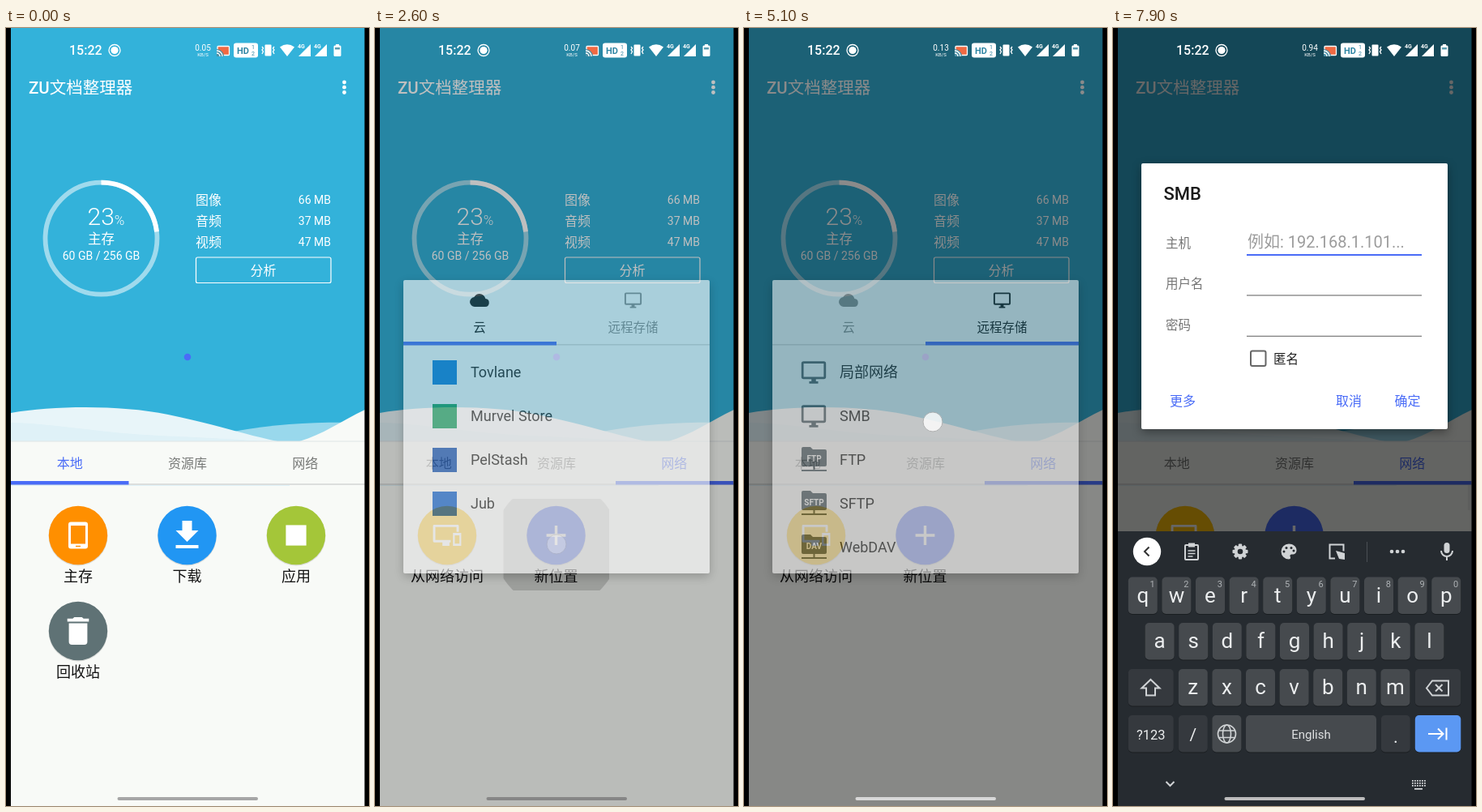
An HTML page that plays this animation: 448x960 px, repeating every 8000 ms.

```html
<!DOCTYPE html>
<html lang="zh-CN">
<head>
<meta charset="utf-8">
<style>
html,body{margin:0;width:100%;height:100%;overflow:hidden;background:#000}
svg{display:block;width:100%;height:100%;font-family:Roboto,"Noto Sans CJK SC","Noto Sans CJK",sans-serif}
.card{filter:drop-shadow(0 4px 6px rgba(0,0,0,.35))}
</style>
</head>
<body>
<svg id="stage" viewBox="0 0 448 960"></svg>
<script>
const BLUE = '#4a6cf7', PAGE = '#f8faf7', GREY = '#777977';
const stage = document.getElementById('stage');

const text = (x, y, size, s, fill = '#fff', more = '') =>
  `<text x="${x}" y="${y}" font-size="${size}" fill="${fill}" ${more}>${s}</text>`;
const mid = (x, y, size, s, fill, more = '') => text(x, y, size, s, fill, `text-anchor="middle" ${more}`);
const rect = (x, y, w, h, fill, r = 0, more = '') =>
  `<rect x="${x}" y="${y}" width="${w}" height="${h}" rx="${r}" fill="${fill}" ${more}/>`;
const circle = (x, y, r, fill, more = '') => `<circle cx="${x}" cy="${y}" r="${r}" fill="${fill}" ${more}/>`;
const path = (d, fill, more = '') => `<path d="${d}" fill="${fill}" ${more}/>`;
const line = (d, color, w = 2) => path(d, 'none', `stroke="${color}" stroke-width="${w}"`);
const group = (id, body) => `<g id="${id}">${body}</g>`;
const icon = (name, x, y, s = 1, fill = '#fff') => path(ICONS[name], fill,
  `fill-rule="evenodd" transform="translate(${x} ${y}) scale(${s}) translate(-12 -12)"`);

const ICONS = {
  tablet: 'M6 1h12a2 2 0 012 2v18a2 2 0 01-2 2H6a2 2 0 01-2-2V3a2 2 0 012-2zM6 4v15h12V4zM10 20.5v1h4v-1z',
  download: 'M19 9h-4V3H9v6H5l7 7 7-7zM5 18v2h14v-2z',
  square: 'M5 5h14v14H5z',
  bin: 'M6 19a2 2 0 002 2h8a2 2 0 002-2V7H6zM19 4h-3.5l-1-1h-5l-1 1H5v2h14z',
  image: 'M21 19V5a2 2 0 00-2-2H5a2 2 0 00-2 2v14a2 2 0 002 2h14a2 2 0 002-2zM8.5 13.5l2.5 3 3.5-4.5 4.5 6H5z',
  note: 'M12 3v10.55A4 4 0 1014 17V7h4V3z',
  play: 'M12 2a10 10 0 100 20 10 10 0 000-20zM10 16.5v-9l6 4.5z',
  doc: 'M19 3H5a2 2 0 00-2 2v14a2 2 0 002 2h14a2 2 0 002-2V5a2 2 0 00-2-2zM14 17H7v-2h7zM17 13H7v-2h10zM17 9H7V7h10z',
  clock: 'M12 2a10 10 0 100 20 10 10 0 000-20zm0 18a8 8 0 110-16 8 8 0 010 16zM12.5 7H11v6l5.2 3.2.8-1.3-4.5-2.7z',
  monitor: 'M21 2H3a2 2 0 00-2 2v12a2 2 0 002 2h7v2H8v2h8v-2h-2v-2h7a2 2 0 002-2V4a2 2 0 00-2-2zm0 14H3V4h18z',
  devices: 'M22 9V4a1 1 0 00-1-1H1a1 1 0 00-1 1v13a1 1 0 001 1h7v3h6v-3h1v-2H2V5h18v4zM17 10v11h7V10zM18.5 12h4v7h-4z',
  plus: 'M11 5h2v6h6v2h-6v6h-2v-6H5v-2h6z',
  cloud: 'M19.35 10.04A7.49 7.49 0 0012 4C9.1 4 6.6 5.6 5.35 8.04A6 6 0 006 20h13a5 5 0 00.35-9.96z'
};

function statusBar() {
  const signal = x => path(`M${x} 35h15V20z`, '#fff') + text(x - 1, 25, 7, '4G', '#fff', 'font-weight="700"');
  return text(78, 33, 16, '15:22', '#fff', 'font-weight="500"') +
    circle(134, 27.5, 7, 'none', 'stroke="#fff" stroke-width="1.3"') + circle(134, 27.5, 4.6, '#fff') +
    mid(243, 28, 10, '', '#fff', 'id="speed"') + mid(243, 34.5, 6, 'KB/S') +
    rect(261, 22.5, 14.5, 11, '#f06a43', 1, 'stroke="#fff" stroke-width="1.3"') +
    path('M260 26a9 9 0 019 9h-9z', '#4b8fa4') + line('M260 28a7 7 0 017 7M260 31a4 4 0 014 4', '#fff', 1.3) +
    rect(281, 18.5, 30, 18, '#fff', 3) + text(285, 31.5, 11, 'HD', '#2f86a4', 'font-weight="700"') +
    text(303, 26, 7, '1', '#2f86a4') + text(303, 34, 7, '2', '#2f86a4') +
    rect(319.5, 20.5, 8, 14, '#fff', 1) +
    line('M316 23l1.5 2-1.5 2 1.5 2-1.5 3M331 23l-1.5 2 1.5 2-1.5 2 1.5 3', '#fff', 1.3) +
    path('M338 23.5Q347 17 356 23.5L347 35z', '#fff') + signal(361) + signal(381) +
    rect(404.5, 21.5, 9, 13.5, '#fff', 1.5) + rect(407, 20, 4, 2, '#fff') + rect(406, 24, 6, 2.5, '#5b9db0');
}

function overview() {
  const rows = [['图像', 66], ['音频', 37], ['视频', 47]];
  const ring = 2 * Math.PI * 69;
  return rect(6, 0, 437, 520, '#33b2da') +
    path('M280 498C340 487 390 486 443 487V520H350z', '#fff', 'opacity=".5"') +
    path('M6 475C60 466 140 465 200 477S300 504 350 513V565H6z', '#e8f5f9') +
    path('M6 487C60 488 120 500 190 503S300 508 350 513V565H6z', '#dff1f7') +
    path('M350 513C385 506 410 487 443 471V565H350z', PAGE) +
    text(28, 81, 20.5, 'ZU文档整理器', '#fff', 'font-weight="500"') +
    [67, 73.2, 79.5].map(y => circle(417.5, y, 2.4, '#fff')).join('') +
    circle(117.5, 259.7, 69, 'none', 'stroke="#fff" stroke-opacity=".53" stroke-width="5.8"') +
    circle(117.5, 259.7, 69, 'none', `stroke="#fff" stroke-width="5.8" stroke-dasharray="${ring * .23} ${ring}" transform="rotate(-90 117.5 259.7)"`) +
    text(100.5, 243, 30, '23<tspan font-size="17">%</tspan>', '#fff', 'font-weight="300"') +
    mid(117.5, 266, 16.5, '主存') + mid(117.5, 286, 14, '60 GB / 256 GB') +
    rows.map(([name, mb], i) => text(234, 218 + 26 * i, 16, name) +
      text(401, 217 + 26 * i, 14, mb + ' MB', '#fff', 'text-anchor="end"')).join('') +
    rect(234.5, 283, 166.5, 31.5, 'none', 2, 'stroke="#fff" stroke-width="1.2"') + mid(317.5, 305, 16, '分析') +
    circle(224, 406, 4.3, BLUE);
}

const FOLDERS = [
  [['主存', '#ff8f00', 'tablet', 1.5], ['下载', '#2196f3', 'download', 2], ['应用', '#a4c639', 'square', 1.8],
   ['回收站', '#5f7275', 'bin', 1.9]],
  [['图像', '#616b9f', 'image', 1.8], ['音频', '#138978', 'note', 1.9], ['视频', '#c46230', 'play', 1.65],
   ['文档', '#255193', 'doc', 1.8], ['新的文件', '#5a6a67', 'clock', 1.65]],
  [['从网络访问', '#ffc107', 'devices', 1.45], ['新位置', '#4a6cf7', 'plus', 1.7]]
];

function folderPage(items, page) {
  return items.map(([label, color, name, s], i) => {
    const x = 89 + 134.5 * (i % 3) + 437 * page, y = 626 + 118 * Math.floor(i / 3);
    return circle(x, y + 1, 36.5, '#000', 'opacity=".12"') + circle(x, y, 36.2, color) +
      icon(name, x, y, s) + mid(x, y + 56.5, 18, label, '#111');
  }).join('');
}

function mainTabs() {
  return rect(6, 510, 437, 54, PAGE) + rect(6, 509.5, 437, 1, '#e0e5e5') +
    rect(6, 562, 437, 2, '#dcdedd') +
    `<g clip-path="url(#tabClip)">${circle(369, 546, 0, '#000', 'id="tabRipple"')}</g>` +
    ['本地', '资源库', '网络'].map((s, i) => mid(78.7 + 145.3 * i, 543, 16, s, GREY, `id="tab${i}"`)).join('') +
    rect(6, 559, 145.5, 4.5, BLUE, 0, 'id="tabBar"');
}

function placeDialog() {
  const clouds = [['Tovlane', '#1081de'], ['Murvel Store', '#1da362'], ['PelStash', '#0f4fb3'], ['Jub', '#1264d1']];
  const remotes = ['局部网络', 'SMB', 'FTP', 'SFTP', 'WebDAV'];
  const row = (i, x, s, art) => art + text(x + 118, 431 + 54 * i, 18, s, '#222');
  const remoteArt = (i, x) => {
    const c = 425 + 54 * i, gray = '#56646a';
    if (i < 2) return icon('monitor', x + 86, c, 1.38, gray);
    return path(`M${x + 73} ${c - 16}h9l3 3h15a2 2 0 012 2v17a2 2 0 01-2 2h-27a2 2 0 01-2-2v-20a2 2 0 012-2z`, gray) +
      line(`M${x + 71} ${c + 13}h31M${x + 86.5} ${c + 8}v5`, gray) +
      mid(x + 86.5, c + 1.5, 10, remotes[i].replace('Web', ''), '#fff', 'font-weight="700"');
  };
  const tab = (id, name, x, s, label) =>
    group(id, icon(name, x, 336, s, 'currentColor') + mid(x, 375, 15.5, label, 'currentColor'));
  return rect(35, 311, 378, 362, '#fff', 2, 'class="card"') + rect(35, 390, 378, 1.5, '#dcdcdc') +
    tab('cloudTab', 'cloud', 129, 1, '云') + tab('remoteTab', 'monitor', 318.5, .96, '远程存储') +
    rect(35, 387, 189, 4.5, BLUE, 0, 'id="placeBar"') +
    `<g clip-path="url(#placeClip)">` + group('places',
      clouds.map(([s, color], i) => row(i, 0, s, rect(71, 410 + 54 * i, 30, 30, color))).join('') +
      remotes.map((s, i) => row(i, 378, s, remoteArt(i, 378))).join('')) + '</g>';
}

function loginDialog() {
  const label = (y, s) => text(65, y, 15.5, s, '#757575');
  const button = (x, s) => text(x, 299, 16, s, BLUE);
  return rect(35, 0, 378, 328, '#fff', 2, 'class="card"') +
    text(62.5, 45, 22, 'SMB', '#1b1b1b', 'font-weight="500"') +
    label(104, '主机') + label(154, '用户名') + label(205, '密码') +
    text(166, 104, 20, '例如: 192.168.1.101...', '#9c9c9c') +
    rect(165, 112, 216, 2, BLUE) + rect(165, 162.3, 216, 1.2, '#777') + rect(165, 212.7, 216, 1.2, '#777') +
    rect(165, 83, 2.2, 27, BLUE, 0, 'id="caret"') +
    rect(170, 231.5, 18.5, 18.5, 'none', 2, 'stroke="#666" stroke-width="2"') + text(198, 246.5, 15.5, '匿名', '#222') +
    button(70, '更多') + button(275, '取消') + button(347.5, '确定');
}

function keyboard() {
  const ink = '#d0d3d5', soft = '#35393e', hard = '#464a4e';
  const key = (x, y, w, s, fill = hard, size = 26, dy = 31) =>
    rect(x, y + 1, w, 45.5, '#1a1e21', 5) + rect(x, y, w, 45.5, fill, 5) + mid(x + w / 2, y + dy, size, s, '#eceeef');
  const letters = (s, x, y) => [...s].map((c, i) => key(x + 41.6 * i, y, 36, c)).join('');
  const spokes = n => Array.from({length: n}, (_, i) =>
    rect(154.8, 636.5, 4.4, 5, ink, 1, `transform="rotate(${360 / n * i} 157 646)"`)).join('');
  const tools = circle(42, 646, 17.2, '#fff') + line('M44.5 640.5l-5.5 5.5 5.5 5.5', '#333') +
    rect(89, 638, 16, 18, 'none', 1, `stroke="${ink}" stroke-width="2"`) + rect(93, 635.5, 8, 5, ink) +
    line('M92.5 645h9M92.5 648.5h9M92.5 652h6', ink, 1.5) +
    spokes(8) + circle(157, 646, 5.3, 'none', `stroke="${ink}" stroke-width="4"`) +
    path('M217 636.5a9.5 9.5 0 100 19c3 0 2-3 1.5-3.5c-.5-2 1-2.5 3-2.5c3 0 5-2 5-5c0-5-4.5-8-9.5-8z', ink) +
    [[211, 646], [214, 641.5], [220, 641.5], [223, 645]].map(p => circle(...p, 1.5, '#262b30')).join('') +
    line('M274 654.5h-6.5v-17h17v8', ink) + path('M275 645l11 3v8l-7-1z', ink) +
    rect(313, 634, 1, 25, '#4a4f54') + [344, 351, 358].map(x => circle(x, 646, 2.3, ink)).join('') +
    rect(408.5, 635, 7, 13, ink, 3.5) + line('M405 645a7 7 0 0014 0M412 652v5', ink);
  const dots = [0, 1, 2].map(r => [0, 1, 2, 3, 4, 5].map(c => rect(369 + 3 * c, 928 + 3 * r, 1.8, 1.8, ink)).join('')).join('');
  return rect(6, 621, 437, 345, '#262b30') + tools +
    letters('qwertyuiop', 18.8, 677.5) +
    [...'1234567890'].map((c, i) => mid(48.7 + 41.6 * i, 689.5, 11, c, '#aeb2b5')).join('') +
    letters('asdfghjkl', 39.6, 734) +
    key(18.8, 791, 56, '', soft) + line('M46.5 804l11 10.5h-5.5v9h-11v-9h-5.5z', ink) +
    letters('zxcvbnm', 80.8, 791) +
    key(372.8, 791, 56.5, '', soft) + line('M387 814.5l7-9h20v18h-20zM398 810l8.5 8.5M406.5 810l-8.5 8.5', ink) +
    key(18.8, 848, 56, '?123', soft, 16.5, 29.5) + key(80.8, 848, 36, '/', soft, 21, 31) +
    key(122.4, 848, 36, '') + circle(140.5, 871, 11, 'none', `stroke="${ink}" stroke-width="1.6"`) +
    `<ellipse cx="140.5" cy="871" rx="5" ry="11" fill="none" stroke="${ink}" stroke-width="1.6"/>` +
    line('M131 867h19M131 875.5h19', ink, 1.6) +
    key(164, 848, 161, '') + mid(244.5, 877, 15, '', '#dfe1e2', 'id="layout"') +
    key(330.8, 848, 36, '.', soft, 22, 34) +
    key(372.8, 848, 56.5, '', '#5b98f3') + line('M389 871h18M401 864.5l6.5 6.5-6.5 6.5M411.5 863.5v15', '#fff') +
    line('M65.5 930l5 5 5-5', ink) + dots + rect(372, 938, 10, 1.8, ink);
}

stage.innerHTML = `<defs>
  <clipPath id="tabClip">${rect(297, 510, 146, 54)}</clipPath>
  <clipPath id="cellClip">${rect(158.5, 581, 130.5, 113, '#000', 3)}</clipPath>
  <clipPath id="placeClip">${rect(35, 392, 378, 281)}</clipPath></defs>` +
  rect(6, 0, 437, 960, PAGE) + overview() +
  group('pages', FOLDERS.map(folderPage).join('')) +
  `<g clip-path="url(#cellClip)">${circle(224, 637, 0, '#000', 'id="cellRipple"')}</g>` +
  mainTabs() + rect(438, 564, 5, 31, '#000', 0, 'id="scrollbar"') +
  rect(6, 0, 437, 960, '#000', 0, 'id="dim"') +
  group('placeDialog', placeDialog()) + group('login', loginDialog()) + group('keys', keyboard()) +
  circle(0, 0, 12, '#fff', 'id="touch" stroke="#aaa" stroke-width="1"') +
  statusBar() + rect(137.5, 949, 173.5, 4, '#aaa', 2, 'id="home"') +
  rect(0, 0, 6, 960, '#000') + rect(442.5, 0, 6, 960, '#000');

const el = id => document.getElementById(id);
const set = (id, attrs) => { for (const k in attrs) el(id).setAttribute(k, attrs[k]); };
const span = (t, a, b) => Math.min(1, Math.max(0, (t - a) / (b - a)));
const easeOut = (x, n = 3) => 1 - (1 - x) ** n;
const smooth = x => x * x * (3 - 2 * x);
// Linear interpolation through [time, value] points.
function track(t, pts) {
  let i = 1;
  while (i < pts.length - 1 && t > pts[i][0]) i++;
  const [a, u] = pts[i - 1], [b, v] = pts[i];
  return u + (v - u) * span(t, a, b);
}

const TAPS = [[369, 550, 980, 1080], [224, 637, 2390, 2500], [318, 356, 4000, 4090], [233, 486, 4980, 5110], [274, 440, 5900, 6070]];
const SPEEDS = [[7400, '0.94'], [4400, '0.13'], [1400, '0.07'], [0, '0.05']];

function draw(t) {
  el('speed').textContent = SPEEDS.find(s => t >= s[0])[1];
  set('pages', {transform: `translate(${-874 * easeOut(span(t, 1051, 1351), 5)} 0)`});
  set('tabBar', {x: 6 + 291 * smooth(span(t, 1060, 1360))});
  [0, 1, 2].forEach(i => set('tab' + i, {fill: i === (t < 1050 ? 0 : 2) ? BLUE : GREY}));
  set('tabRipple', {r: 104 * span(t, 1000, 1200), opacity: .26 * (1 - span(t, 1110, 1400))});
  set('cellRipple', {r: 78 * span(t, 2400, 2600), opacity: .16 * (1 - span(t, 2600, 2850))});
  set('scrollbar', {opacity: track(t, [[6050, 0], [6120, .3], [6500, .3], [6900, .06]])});

  set('dim', {opacity: track(t, [[2540, 0], [2600, .25], [2750, .6], [5040, .6], [5100, .46], [5220, .3], [5400, .6]])});
  const bar = track(t, [[2540, 166], [2600, 134], [2750, 186], [5040, 186], [5100, 216], [5400, 188]]);
  set('home', {fill: `rgb(${bar},${bar},${bar})`});
  set('placeDialog', {opacity: track(t, [[2540, 0], [2600, .6], [2690, 1], [5040, 1], [5100, .54], [5180, 0]])});
  set('places', {transform: `translate(${-378 * easeOut(span(t, 4070, 4320), 5)} 0)`});
  set('placeBar', {x: 35 + 189 * smooth(span(t, 4070, 4370))});
  const remote = t >= 4070;
  set('cloudTab', {color: remote ? '#8a8c8c' : '#111'});
  set('remoteTab', {color: remote ? '#111' : '#8a8c8c'});

  const up = easeOut(span(t, 6084, 6334));
  set('login', {opacity: span(t, 5200, 5380), transform: `translate(0 ${328 - 161 * up})`});
  set('caret', {opacity: t >= 6000 && (t - 6000) % 1000 < 500 ? 1 : 0});
  set('keys', {transform: `translate(0 ${340 * (1 - easeOut(span(t, 5980, 6257)))})`});
  el('layout').textContent = t < 6800 ? '拼音' : 'English';

  const tap = TAPS.find(p => t >= p[2] && t < p[3] + 160);
  set('touch', tap ? {cx: tap[0], cy: tap[1], opacity: .8 * (1 - span(t, tap[3], tap[3] + 160))} : {opacity: 0});
}

const start = performance.now();
function tick() {
  draw((performance.now() - start) % 8000);
  requestAnimationFrame(tick);
}
tick();
</script>
</body>
</html>
```
